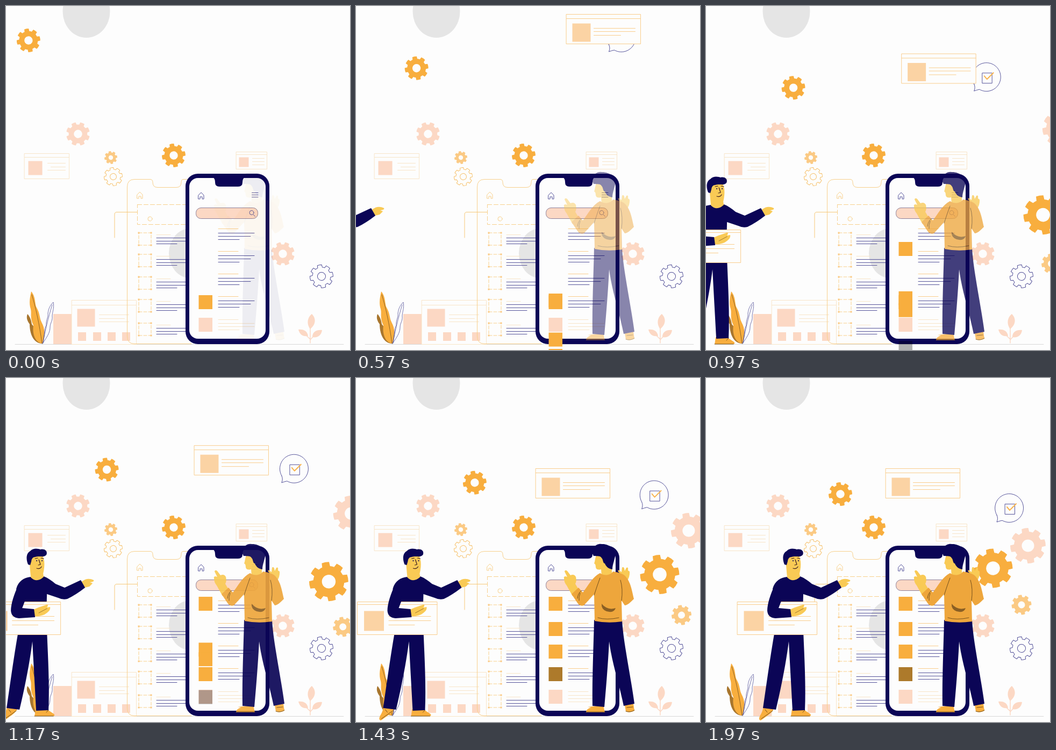
Recreate the animation shown at these times as an HTML page. Size 640x640 px, loop 2.01 s.

```html
<!DOCTYPE html>
<html lang="en">
<head>
<meta charset="utf-8">
<title>App building team</title>
<style>
@property --n { syntax: "<number>"; inherits: true; initial-value: 0; }
html, body { margin: 0; width: 100%; height: 100%; overflow: hidden; background: #fdfdfd; }
svg { display: block; width: 100vw; height: 100vh; fill: none; stroke-linecap: round; stroke-linejoin: round;
  animation: tick 2010ms -5ms infinite; }
/* --n counts the 30 fps steps; every moving part derives its pose from it */
@keyframes tick {
  0% { --n: 0; animation-timing-function: steps(60); }
  99.5%, 100% { --n: 60; }
}
.move {
  --left: max(0, var(--end) - var(--n));
  transform: translate(calc(var(--left) * var(--vx) * 1px), calc(var(--left) * var(--vy) * 1px));
}
.fade { opacity: calc(min(1, .06 + .0245 * var(--n))); }
.navy { fill: #0b0556; } .skin { fill: #f9ca55; } .orange { fill: #f8ae3e; }
.peach { fill: #fcd8c4; } .yellow { fill: #fbca84; } .paper { fill: #fdfdfd; }
.shirt { fill: #eea63c; } .grey { fill: #e5e5e5; } .gold { fill: #fbd3a4; }
.pale { stroke: #f8e5c8; } .wire { stroke: #f8d08c; } .ink { stroke: #55539a; } .warm { stroke: #f9cd8c; }
.brown { stroke: #74501c; } .ground { stroke: #d9d9d9; }
</style>
</head>
<body>
<svg id="stage" viewBox="0 0 640 640"></svg>
<script>
const rect = (x, y, w, h, cls, r = 0) =>
  `<rect x="${x}" y="${y}" width="${w}" height="${h}" rx="${r}" class="${cls}"/>`;
const path = (d, cls, extra = '') => `<path d="${d}" class="${cls}" ${extra}/>`;
const line = (x, y, x2, cls) => path(`M${x} ${y}H${x2}`, cls);
const move = (end, vx, vy, body) =>
  `<g class="move" style="--end:${end};--vx:${vx};--vy:${vy}">${body}</g>`;

function gear(x, y, r, cls, turn = -10) {
  const root = r * .79, hole = r * .35;
  const at = (rad, a) => `${(rad * Math.cos(a)).toFixed(2)} ${(rad * Math.sin(a)).toFixed(2)}`;
  let d = '';
  for (let i = 0; i < 8; i++) {
    const a = i * Math.PI / 4;
    d += `${i ? `A${root} ${root} 0 0 1 ` : 'M'}${at(root, a - .26)}L${at(r, a - .19)}` +
      `A${r} ${r} 0 0 1 ${at(r, a + .19)}L${at(root, a + .26)}`;
  }
  d += `ZM${hole} 0A${hole} ${hole} 0 1 0 ${-hole} 0A${hole} ${hole} 0 1 0 ${hole} 0Z`;
  return path(d, cls, `fill-rule="evenodd" transform="translate(${x} ${y}) rotate(${turn})"`);
}

// Browser-like card: header rule, picture square, text lines [x, y, x2]
const card = (x, y, w, h, head, [sx, sy, s], lines, edge = 'pale', pic = 'peach') =>
  '<g transform="translate(.5 .5)">' +
  rect(x, y, w, h, 'paper ' + edge) + line(x, y + head, x + w, edge) +
  rect(x + sx, y + sy, s, s, pic) +
  lines.map(([a, b, c]) => line(x + a, y + b, x + c, edge)).join('') + '</g>';

const home = (x, y, cls) =>
  path(`M${x - 5} ${y - 1}L${x} ${y - 6}L${x + 5} ${y - 1}V${y + 6}H${x + 2}V${y + 2}H${x - 2}V${y + 6}H${x - 5}Z`, cls);

const backdrop = () =>
  `<ellipse cx="149.500" cy="10" rx="44" ry="49" class="grey"/>` +
  gear(134, 238, 22, 'peach', 22) + gear(195, 282, 12, 'yellow') +
  gear(199.5, 317.5, 17, '" stroke="#f6c06a') + gear(312, 278, 22, 'orange') +
  gear(515, 461, 22, 'peach', 22) + gear(587, 503, 21.5, 'ink') +
  card(34, 274, 83, 47, 7, [7, 14, 26], [[43, 18, 76], [49, 25, 76], [43, 31, 76]]) +
  card(428, 271, 57, 32, 5, [5, 10, 18], [[30, 12, 52], [30, 18, 52], [30, 24, 52]]) +
  line(17, 629.5, 628, 'ground') +
  rect(88, 573, 34, 56, 'peach') +
  card(122, 547, 120, 82, 9, [10, 16, 33], [[51, 27, 106], [51, 34, 98], [51, 40, 106]]) +
  [134, 162, 189, 216].map(x => rect(x, 607, 15, 16, 'peach')).join('');

const plants = () =>
  path('M68 628C48 628 44 604 44 592C38 584 38 578 40 573C46 580 47 586 48 592C56 600 53 606 57 612Z', '', 'fill="#a8762e"') +
  path('M68 628C52 626 49 606 51 594C44 580 48 572 46 564C42 552 45 540 47 531C56 542 53 554 57 561C64 574 62 580 66 588C74 602 72 616 68 628Z', 'orange') +
  path('M67 628C62 590 55 560 48 537', 'brown', 'stroke-width=".8"') +
  path('M68 628C72 612 71 600 75 594C74 584 79 580 78 572C79 562 83 556 88 551C90 562 86 570 86 577C87 586 82 590 82 597C82 608 76 616 68 628ZM69 627C73 603 78 582 86 556', 'ink', 'stroke-width=".8"') +
  path('M566 627V598M566 620Q558 612 551 606M566 621Q574 612 581 606', '', 'stroke="#fcd8c4" stroke-width="1.500"') +
  path('M566 601C558 590 562 578 569 573C577 581 577 592 566 601ZM562 614C550 616 546 609 544 602C555 601 561 606 562 614ZM570 616C570 606 578 602 588 603C587 612 580 618 570 616Z', 'peach');

function wireframe() {
  let s = `<ellipse cx="342" cy="460" rx="39" ry="46" class="grey"/>` +
    path('M345 322.500H330Q326 322.500 326 328Q326 337.500 317 337.500H282Q273 337.500 273 328Q273 322.500 268 322.500H239Q225.500 322.500 225.500 337V614Q225.500 628.500 239 628.500H345', 'wire') +
    home(249, 352, 'wire') +
    rect(244.5, 369.5, 110, 37, 'wire" stroke-dasharray="8 4') +
    `<circle cx="268" cy="396" r="4" class="wire"/>` +
    path('M244 383.500H206Q202 383.500 202 388V431', '', 'stroke="#f6c878"');
  for (const y of [422, 462, 504, 546, 590]) {
    s += rect(247, y, 23, 23, 'wire" stroke-dasharray="6 3') +
      [[0, 0], [23, 0], [0, 23], [23, 23]].map(([a, b]) => rect(245.5 + a, y - 1.5 + b, 3, 3, 'yellow')).join('') +
      line(280, y + 9.5, 336, 'ink') + line(280, y + 15.5, 336, 'ink') + line(280, y + 20.5, 318, 'ink') +
      line(280, y + 3.5, 306, 'pale');
  }
  return s;
}

function phone() {
  let s = rect(334, 312, 156, 317, 'navy', 23) + rect(341, 320, 142, 299, 'paper', 16) +
    path('M385 319H444Q440 321 440 328Q440 336 432 336H397Q389 336 389 328Q389 321 385 319Z', 'navy') +
    home(363, 353, 'ink') +
    [347.5, 351.5, 355.5].map(y => line(457.5, y, 469, 'ink')).join('') +
    rect(353.5, 375.5, 115, 20, 'peach" stroke="#8d7f98', 9) +
    `<circle cx="457" cy="384.500" r="4" class="ink"/>` + path('M460 388L463.500 391.500', 'ink');
  for (const y of [414.5, 456.5, 498.5, 540.5]) {
    s += line(395, y, 432, 'warm') + line(395, y + 8, 462, 'ink') +
      line(395, y + 14, 455, 'ink') + line(395, y + 20, 434, 'ink');
  }
  for (const [y, x] of [[583.5, 432], [590.5, 462], [596.5, 462], [602.5, 434]]) s += line(395, y, x, 'pale');
  const tile = (y, cls) => rect(358.5, y - 13, 25.5, 26, cls);
  return s + tile(551, 'orange') + tile(593, 'peach') +
    move(33, 0, 8, tile(420, 'orange')) +
    move(41, 0, 6.4, tile(467, 'orange')) +
    move(37, 0, 7.1, tile(509, 'orange')) +
    move(41, 0, 7.1, tile(551, '" fill="#000" fill-opacity=".3'));
}

const woman = () => '<g class="fade">' +
  path('M431 612L460 609L463 622H428Q428 616 437 613ZM500 609L516 606L518 619Q508 624 502 620Z', 'orange') +
  path('M429 621H463M502 620Q510 623 518 618M504 613L515 612', 'brown') +
  path('M443 450H495C497 490 512 560 518 606L498 610C490 570 476 530 471 490C469 530 465 580 462 612L440 610C439 560 442 500 443 450Z', 'navy') +
  path('M492 376L490 362Q486 360 488 357L494 361L495 353Q497 350 499 354L500 359L503 353Q507 351 506 358L509 360Q510 370 503 380Z', 'skin') +
  path('M388 360Q389 356 393 359L399 367Q406 364 409 370Q411 377 408 383L414 393L403 406L392 386Q387 380 387 373Q386 369 390 369L393 370Z', 'skin') +
  path('M447 330C444 338 445 341 443 345Q446 346 446 352Q447 358 456 356L457 370H476V340L462 326Z', 'skin') +
  path('M440 327C437 316 448 307 457 309C470 308 484 318 482 332C480 342 477 348 477 356C470 355 465 351 463 345C459 345 460 337 457 335C455 330 449 332 442 331Z', 'navy') +
  path('M454 363C462 369 474 367 478 360C490 362 498 364 503 371C512 382 514 400 517 411C511 417 506 422 500 423L494 414L495 453Q468 457 444 452L443 402L424 423Q416 426 411 417L401 402L414 390L422 399C432 386 440 370 454 363Z', 'shirt') +
  path('M457 420Q468 433 483 428Q480 438 466 434Q456 430 457 420Z', '', 'fill="#8a5f24"') +
  path('M454 372Q448 388 443 404M492 376Q497 392 494 414M450 446Q466 451 489 446M412 410Q413 400 419 396M415 414Q414 408 417 400', 'brown') +
  '</g>';

const man = () => '<g transform="translate(54)">' +
  path('M53 611L72 615Q71 620 62 627L48 637Q43 637 46 629Q51 622 53 611ZM106 616L128 617L140 625Q143 629 138 629H104Z', 'orange') +
  path('M49 634L70 619M104 629H139M60 622L56 617M126 622L130 618', 'brown') +
  path('M74 470H127C129 520 132 570 130 618L107 619C105 580 102 530 100 490C95 530 85 580 76 617L52 614C60 560 66 515 74 470Z', 'navy') +
  path('M188 381L198 375Q206 372 214 376Q216 379 207 380L212 382L206 388L193 391Z', 'skin') +
  path('M97 370Q108 378 121 369C129 372 136 377 143 383L160 390L190 376L198 390Q180 404 165 411Q156 413 148 409L127 402L126 440H75L70 392C74 378 84 371 97 370Z', 'navy') +
  path('M94 337L97 371Q108 382 121 370L120 364Q123 352 122 341L119 329H94Z', 'skin') +
  path('M92 347C88 338 88 326 96 322C102 315 112 318 115 319C123 317 129 322 126 329C121 335 114 330 105 333Q99 333 98 341L96 348Z', 'navy') +
  path('M105 336L110 335M116 335L121 336M112 338L115 347L111 348M108 354Q114 356 117 351', '', 'stroke="#3a1c20" stroke-width="1.200"') +
  '<circle cx="108" cy="340" r="1.100" class="navy"/><circle cx="118" cy="340" r="1.100" class="navy"/>' +
  card(4, 416, 148, 61, 5, [12, 17, 37], [[58, 27, 136], [58, 35, 136], [58, 43, 106]], 'warm', 'gold') +
  path('M102 431L111 427L126 422Q131 421 127 427L133 426Q134 432 127 437Q119 444 103 443Z', 'skin') +
  path('M112 437L127 429', 'brown', 'stroke-width=".7"') +
  path('M74 385C66 402 60 420 60 433Q61 446 75 447L105 445L103 430L81 428L88 410Z', 'navy') +
  '</g>';

const bubble = () =>
  path('M541 255A26.500 26.500 0 1 1 551 265Q546 266 541 268Q544 261 541 255Z', 'paper ink') +
  rect(556.5, 234.5, 18, 19, 'ink') +
  path('M560 240L565 246L577 234', '', 'stroke="#f8b450" stroke-width="2"');

document.getElementById('stage').innerHTML =
  backdrop() + plants() +
  move(50, -4.163, -3.04, gear(250, 216, 22, 'orange')) +
  move(50, 2.85, -4, gear(599, 312, 33, 'peach')) +
  move(50, 4.43, 1.65, gear(534, 354, 36.5, 'orange')) +
  move(50, 2.65, 2.73, gear(587, 422, 18.5, 'yellow')) +
  move(47, -2.35, -6.1, bubble()) +
  move(42, 2.28, -6.12, card(334, 168, 138, 55, 8, [11, 17, 34], [[51, 26, 128], [51, 32, 128], [51, 39, 101]], 'warm', 'gold')) +
  wireframe() + phone() + woman() +
  move(52, -6.17, 0, man());
</script>
</body>
</html>
```
